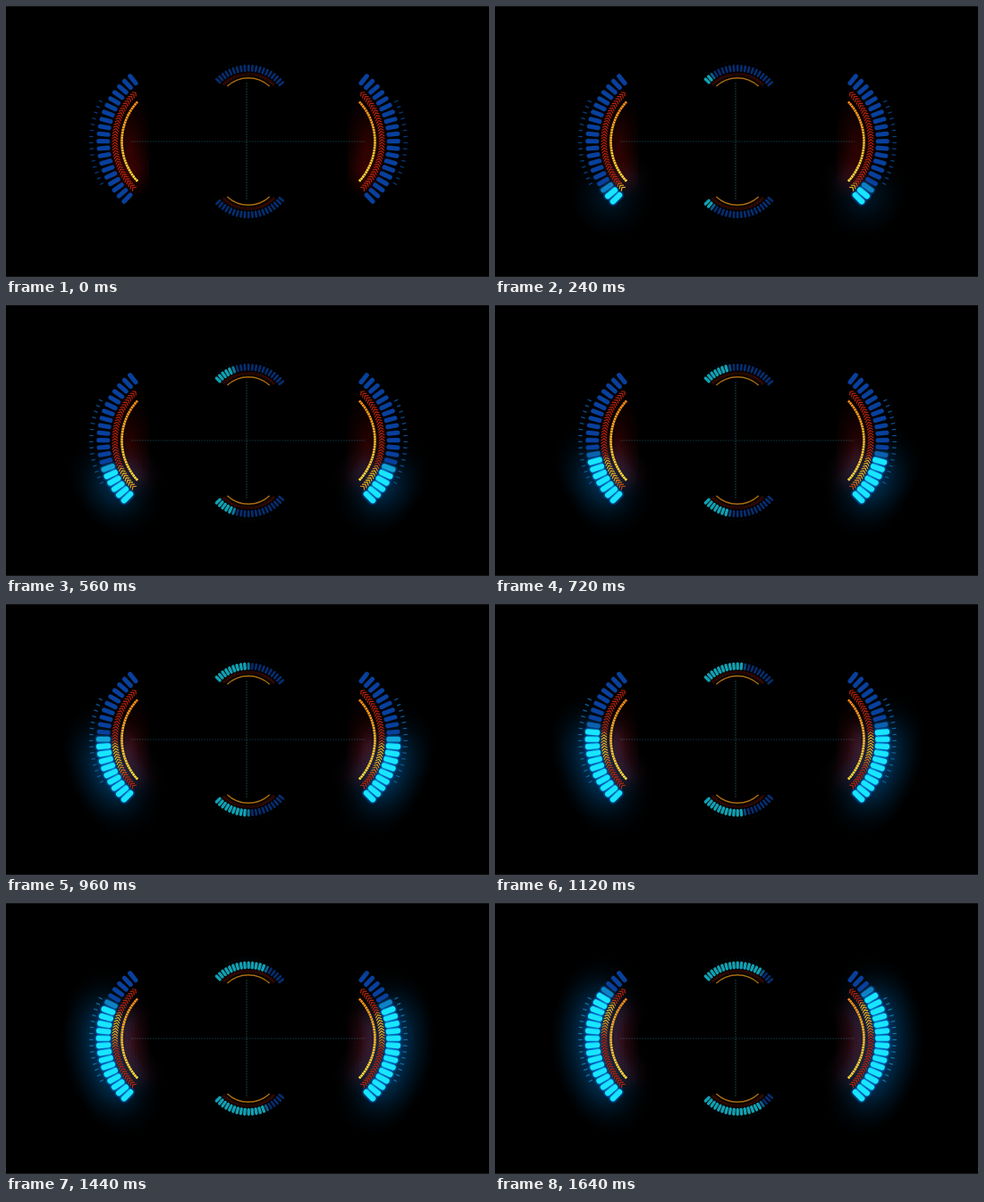
An HTML page with a canvas for the animation above (1680 ms loop, 540 by 304 pixels).

```html
<!DOCTYPE html>
<html>
<head>
<meta charset="utf-8">
<style>
  html, body { margin: 0; background: #000; overflow: hidden; }
  canvas { display: block; width: 540px; height: 304px; }
</style>
</head>
<body>
<canvas width="540" height="304"></canvas>
<script>
const ctx = document.querySelector('canvas').getContext('2d');
const LOOP = 1680, FRAME = 40, STEP = 100;
const BARS = 20, CHEVRONS = 39, TICKS = 15;
const rad = deg => deg * Math.PI / 180;
const clamp = v => Math.max(0, Math.min(1, v));
const mix = (a, b, k) => `rgb(${a.map((v, i) => v + (b[i] - v) * k)})`;
const barAngle = i => -45.5 + i * 96.5 / (BARS - 1);

// Run draw() in a frame turned so that the gauge radius lies on -x.
function at(deg, draw) {
  ctx.save();
  ctx.rotate(rad(deg));
  draw();
  ctx.restore();
}

function line(color, width, ...points) {
  ctx.strokeStyle = color;
  ctx.lineWidth = width;
  ctx.beginPath();
  points.forEach(([x, y]) => ctx.lineTo(x, y));
  ctx.stroke();
}

function glow(x, y, rx, ry, rgb, alpha) {
  ctx.save();
  ctx.globalCompositeOperation = 'lighter';
  ctx.translate(x, y);
  ctx.scale(rx, ry);
  const g = ctx.createRadialGradient(0, 0, 0, 0, 0, 1);
  g.addColorStop(0, `rgba(${rgb},${alpha})`);
  g.addColorStop(0.5, `rgba(${rgb},${alpha * 0.4})`);
  g.addColorStop(1, `rgba(${rgb},0)`);
  ctx.fillStyle = g;
  ctx.fillRect(-1, -1, 2, 2);
  ctx.restore();
}

function halos(lit) {
  const dim = 1 - 0.5 * lit / BARS;
  ctx.save();
  ctx.beginPath();
  ctx.rect(-140, -120, 102, 240);
  ctx.clip();
  glow(-60, 6, 28, 62, '95,6,4', 0.5 * dim);
  glow(-56, 34, 26, 30, '95,4,2', 0.35 * clamp(1.3 - lit / 4));
  ctx.restore();
  for (let i = 0; i < BARS; i++) {
    const k = clamp(lit - i);
    if (k) at(barAngle(i), () => {
      glow(-94, 0, 43, 43, '0,95,165', 0.11 * k);
      glow(-62, 0, 26, 26, '80,38,72', 0.07 * k);
    });
  }
}

function gauge(lit, small) {
  ctx.lineCap = 'butt';
  const tickColor = mix([8, 56, 120], [20, 125, 180], lit / BARS);
  ctx.save();
  if (small) ctx.globalAlpha *= 0.3;
  for (let i = 0; i < TICKS; i++)
    at(-27.5 + i * 53.5 / (TICKS - 1), () => line(tickColor, 1.3, [-105, 0], [-100.5, 0]));
  ctx.restore();

  ctx.save();
  if (small) ctx.globalAlpha *= 0.7;
  for (let i = 0; i < CHEVRONS; i++) {
    const deg = -43.5 + i * 88.5 / (CHEVRONS - 1);
    const behind = lit - (deg + 45) * (BARS - 1) / 96;
    const hot = small ? 0 : clamp(behind - 0.8) * clamp((7.5 - behind) / 3);
    at(deg, () => line(mix([180, 36, 12], [236, 178, 36], hot), 1.2,
      [-79.5, 1.4], [-76.3, -1.2], [-73, 1.4]));
  }
  ctx.restore();

  const gold = ctx.createLinearGradient(0, -44, 0, 44);
  gold.addColorStop(0, '#f88a14');
  gold.addColorStop(0.5, '#ffbe2a');
  gold.addColorStop(1, '#ffdc3a');
  ctx.strokeStyle = small ? '#f29a18' : gold;
  ctx.lineWidth = 2.7;
  ctx.setLineDash(small ? [] : [2.4, 0.5]);
  ctx.beginPath();
  ctx.arc(-3, 0, 65.5, rad(137), rad(223));
  ctx.stroke();
  ctx.setLineDash([]);

  ctx.lineCap = 'round';
  for (let i = 0; i < BARS; i++) {
    const k = clamp(lit - i);
    at(barAngle(i), () => {
      if (k && !small) {
        line(`rgba(0,100,210,${0.3 * k})`, 11, [-94, 0], [-84.5, 0]);
        line(`rgba(0,140,240,${0.45 * k})`, 8, [-94, 0], [-84.5, 0]);
      }
      line(mix([8, 64, 156], [24, 230, 255], k), 5.1 + 1.2 * k, [-94.3, 0], [-84.2, 0]);
    });
  }
}

function place(x, y, sx, sy, draw) {
  ctx.save();
  ctx.translate(x, y);
  ctx.scale(sx, sy);
  draw();
  ctx.restore();
}

function crosshair() {
  ctx.lineCap = 'butt';
  ctx.setLineDash([2, 1]);
  line('#0e2c32', 1, [140, 152], [402, 152]);
  line('#184048', 1, [269, 86], [269, 217]);
  ctx.setLineDash([]);
}

function render(t) {
  const lit = t / STEP;
  ctx.fillStyle = '#000';
  ctx.fillRect(0, 0, 540, 304);
  ctx.fillStyle = '#141414';
  ctx.fillRect(0, 0, 540, 1);
  ctx.fillRect(0, 303, 540, 1);
  crosshair();
  for (const side of [1, -1])
    place(271 - 73 * side, 152, side, 1, () => {
      halos(lit);
      gauge(lit, false);
    });
  for (const side of [1, -1])
    place(271, 152 - 35 * side, 0.53, 0.53 * side, () => {
      ctx.globalAlpha = 0.7;
      ctx.rotate(Math.PI / 2);
      gauge(lit, true);
    });
}

const start = performance.now();
function tick() {
  const t = (performance.now() - start) % LOOP;
  render(Math.floor(t / FRAME) * FRAME);
  requestAnimationFrame(tick);
}
tick();
</script>
</body>
</html>
```
